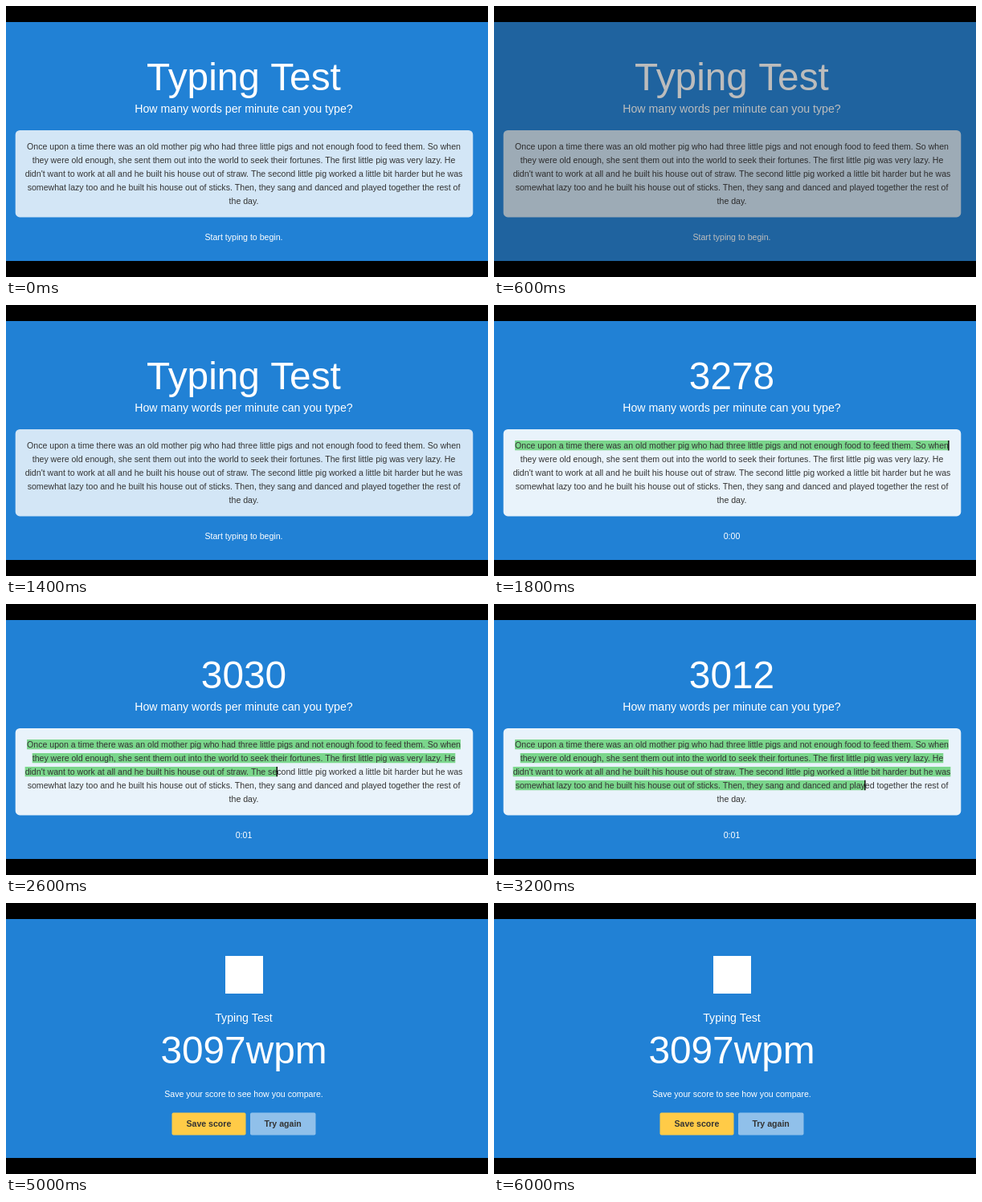
Recreate the animation shown at these times as an HTML page with a canvas. Size 600 px wide and 338 px high, loop 6100 ms.

```html
<!DOCTYPE html>
<html lang="en">
<head>
<meta charset="utf-8">
<title>Typing Test</title>
<style>
  html, body { margin: 0; height: 100%; overflow: hidden; background: #000; }
  canvas { display: block; }
</style>
</head>
<body>
<canvas id="stage" width="600" height="338"></canvas>
<script>
const ctx = document.getElementById('stage').getContext('2d');
const LOOP = 6100, STEP = 100, CENTER = 296;
const BIG = 47.8, MEDIUM = 14.16, SMALL = 10.58;
const DIM_END = 1400, TYPE_START = 1500, RESULT_START = 3400;

const LINES = [
  'Once upon a time there was an old mother pig who had three little pigs and not enough food to feed them. So when',
  'they were old enough, she sent them out into the world to seek their fortunes. The first little pig was very lazy. He',
  "didn't want to work at all and he built his house out of straw. The second little pig worked a little bit harder but he was",
  'somewhat lazy too and he built his house out of sticks. Then, they sang and danced and played together the rest of',
  'the day.'
];
const STORY = LINES.join(' ');
const upTo = phrase => STORY.indexOf(phrase) + phrase.length;

// Typing progress: time, characters typed, words per minute
const KEYS = [
  [1440, 0, 3420],
  [1800, LINES[0].length, 3278],
  [2600, upTo('straw. The se'), 3030],
  [3200, upTo('danced and play'), 3012],
  [3370, STORY.length, 3097]
];

function progress(t, column) {
  let i = 1;
  while (i < KEYS.length - 1 && t > KEYS[i][0]) i++;
  const a = KEYS[i - 1], b = KEYS[i];
  const k = Math.min(1, (t - a[0]) / (b[0] - a[0]));
  return Math.round(a[column] + (b[column] - a[column]) * k);
}

function setFont(size, weight = 'normal') {
  ctx.font = `${weight} ${size}px "Liberation Sans", Arial, sans-serif`;
}

function label(text, y, size, color = '#fff', x = CENTER, weight) {
  setFont(size, weight);
  ctx.textAlign = 'center';
  ctx.fillStyle = color;
  ctx.fillText(text, x, y);
}

function box(x, y, w, h, color, radius = 0) {
  ctx.fillStyle = color;
  ctx.beginPath();
  ctx.roundRect(x, y, w, h, radius);
  ctx.fill();
}

function drawStory(typed) {
  const active = typed >= 0;
  box(11.7, 155, 569.6, 108.4, `rgba(255,255,255,${active ? 0.9 : 0.8})`, 5.5);
  setFont(SMALL);
  let start = 0;
  LINES.forEach((line, i) => {
    const y = 178.7 + i * 16.95;
    const left = CENTER - ctx.measureText(line).width / 2;
    const count = Math.min(line.length, typed - start);
    const width = ctx.measureText(line.slice(0, Math.max(0, count))).width;
    if (count > 0) box(left, y - 9.6, width, 12.2, '#7bd68c');
    label(line, y, SMALL, '#333');
    if (count >= 0 && typed <= start + line.length) {
      box(left + width - 0.7, y - 9.7, 1.4, 12.4, '#000');
    }
    start += line.length + 1;
  });
}

function drawTest(t) {
  const typing = t >= TYPE_START;
  label(typing ? progress(t, 2) : 'Typing Test', 105, BIG);
  label('How many words per minute can you type?', 133, MEDIUM);
  drawStory(typing ? progress(t, 1) : -1);
  const status = t < 2500 ? '0:00' : '0:01';
  label(typing ? status : 'Start typing to begin.', 292.3, SMALL);
  if (t < DIM_END) box(0, 20, 600, 298, `rgba(30,30,30,${0.64 * t / 1300})`);
}

function drawResult() {
  box(273, 66, 47, 47, '#fff');
  label('Typing Test', 148, MEDIUM);
  label('3097wpm', 199.5, BIG);
  label('Save your score to see how you compare.', 242.2, SMALL);
  box(206.5, 261.5, 92, 28, '#ffcb47', 2);
  box(304, 261.5, 81.5, 28, 'rgba(255,255,255,.5)', 2);
  label('Save score', 279, SMALL, '#333', 252.4, 'bold');
  label('Try again', 279, SMALL, '#333', 344.6, 'bold');
}

function draw(now) {
  const t = Math.floor(now % LOOP / STEP) * STEP;
  box(0, 0, 600, 338, '#000');
  box(0, 20, 600, 298, '#2181d5');
  if (t < RESULT_START) drawTest(t);
  else drawResult();
}

const begin = performance.now();
function tick() {
  draw(performance.now() - begin);
  requestAnimationFrame(tick);
}
tick();
</script>
</body>
</html>
```
